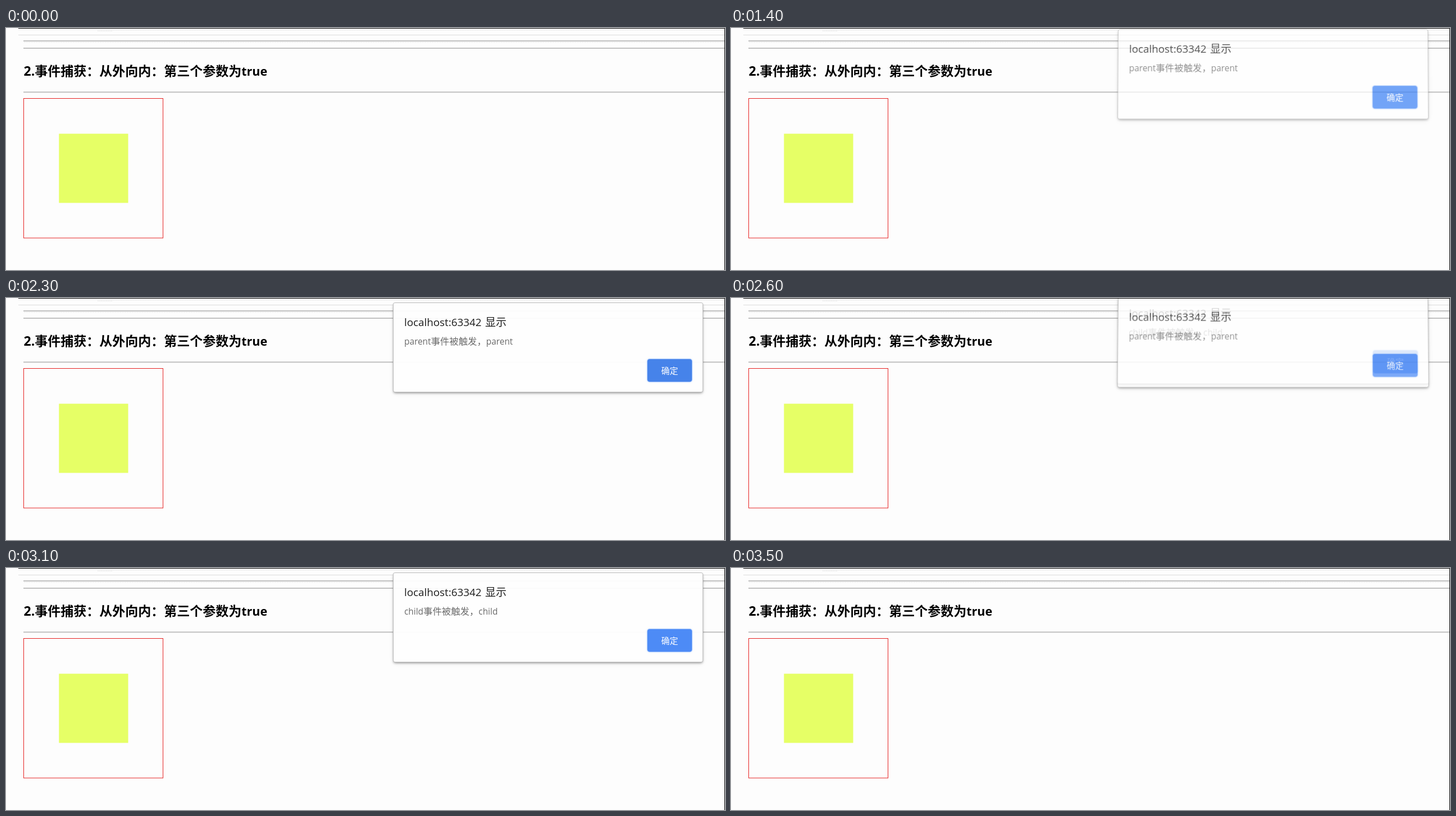
An HTML page that plays this animation: 1280 px wide and 431 px high, repeating every 4 s.

```html
<!DOCTYPE html>
<html lang="zh-CN">
<head>
<meta charset="utf-8">
<title>事件捕获</title>
<style>
  html, body { margin: 0; width: 100%; height: 100%; overflow: hidden; background: #fdfdfd; }
  svg { position: absolute; left: 0; top: 0; width: 1280px; height: 431px; }
  text {
    font-family: "Open Sans", "Noto Sans CJK SC", "Noto Sans CJK", sans-serif;
    text-spacing-trim: space-all;
    white-space: pre;
  }
  h1 { margin: 0; }

  /* Dialogs slide out from under the top edge of the page. */
  .clip { position: absolute; left: 0; top: 1px; width: 1279px; height: 430px; overflow: hidden; }
  .dialog {
    position: absolute; left: 690px; top: 8px; width: 550px; height: 158px;
    box-sizing: border-box;
    background: rgba(254, 254, 254, .95);
    border-radius: 3px;
    box-shadow: 0 0 0 1px #bdbdbd, 0 2px 4px rgba(0, 0, 0, .42), 0 3px 10px rgba(0, 0, 0, .08);
    transform-origin: 50% 0;
    opacity: 0;
  }
  .dialog svg { width: 550px; height: 158px; }
  .title { font-size: 18.8px; fill: #1c1c1c; }
  .note { font-size: 15.4px; fill: #6a6a6a; }
  .note .zh { font-size: 16.4px; }
  .button {
    position: absolute; left: 452px; top: 100px; width: 79px; height: 40px;
    border-radius: 4px; background: #4285f4;
    box-shadow: 0 0 0 1px #a9c8fb, 0 0 3px 1px rgba(66, 133, 244, .22);
  }

  .dialog, .button { animation: 4s step-end infinite; }
  #parent { animation-name: parent; }
  #child { animation-name: child; }
  #parent .button { animation-name: press-parent; }
  #child .button { animation-name: press-child; }

  @keyframes parent {
    0%    { opacity: 0; transform: none; }
    32.5% { opacity: .03; transform: perspective(1000px) translateY(-23.3px) rotateX(4.3deg); }
    35%   { opacity: .75; transform: perspective(1000px) translateY(-6px) rotateX(1.2deg); }
    37.5% { opacity: 1; transform: none; }
    65%   { opacity: .88; transform: perspective(1000px) translateY(-9.3px) rotateX(1.8deg); }
    67.5%, 100% { opacity: 0; transform: none; }
  }
  @keyframes child {
    0%    { opacity: 0; transform: none; }
    65%   { opacity: .18; transform: perspective(1000px) translateY(-16px) rotateX(3deg); }
    67.5% { opacity: .9; transform: perspective(1000px) translateY(-3px) rotateX(.6deg); }
    70%   { opacity: 1; transform: none; }
    80%   { opacity: .86; transform: perspective(1000px) translateY(-9.3px) rotateX(1.8deg); }
    82.5% { opacity: .35; transform: perspective(1000px) translateY(-17px) rotateX(3.2deg); }
    85%   { opacity: .05; transform: perspective(1000px) translateY(-22px) rotateX(4.1deg); }
    87.5%, 100% { opacity: 0; transform: none; }
  }
  @keyframes press-parent {
    0%    { background: #4285f4; }
    57.5% { background: #4683ea; }
    62.5%, 100% { background: #4d8bf6; }
  }
  @keyframes press-child {
    0%    { background: #4683ea; }
    77.5%, 100% { background: #4d8bf6; }
  }
</style>
</head>
<body>
<svg viewBox="0 0 1280 431">
  <path d="M163 3.5H1279M163 5.5H190" stroke="#e9e9e9" stroke-dasharray="2 1"/>
  <path d="M22 12.5H1279" stroke="#dcdcdc"/>
  <path d="M31 23H1279M31 36H1279M31 114.3H1279" stroke="#c1c1c1" stroke-width="2"/>
  <path d="M32 25.5H1279" stroke="#e6e6e6" stroke-dasharray="2 1"/>
  <text x="31.5" y="84.5" font-size="23" font-weight="700">2.事件捕获：从外向内：第三个参数为<tspan font-size="21.5">true</tspan></text>
  <rect x="31.5" y="125.5" width="248" height="248.5" fill="none" stroke="#e62222"/>
  <rect x="94.3" y="188.3" width="123.2" height="123.2" fill="#e6ff66"/>
</svg>

<div class="clip">
  <div class="dialog" id="parent">
    <div class="button"></div>
    <svg viewBox="690 9 550 158">
      <text class="title" x="709" y="50">localhost:63342<tspan x="853" font-size="19">显示</tspan></text>
      <text class="note" x="709" y="82.5">parent<tspan class="zh">事件被触发，</tspan>parent</text>
      <text x="1166.5" y="135.3" font-size="15" fill="#fff">确定</text>
    </svg>
  </div>
  <div class="dialog" id="child">
    <div class="button"></div>
    <svg viewBox="690 9 550 158">
      <text class="title" x="709" y="50">localhost:63342<tspan x="853" font-size="19">显示</tspan></text>
      <text class="note" x="709" y="82.5">child<tspan class="zh">事件被触发，</tspan>child</text>
      <text x="1166.5" y="135.3" font-size="15" fill="#fff">确定</text>
    </svg>
  </div>
</div>

<svg viewBox="0 0 1280 431">
  <path d="M22 .5H1279.5V431" fill="none" stroke="#000"/>
</svg>
</body>
</html>
```
